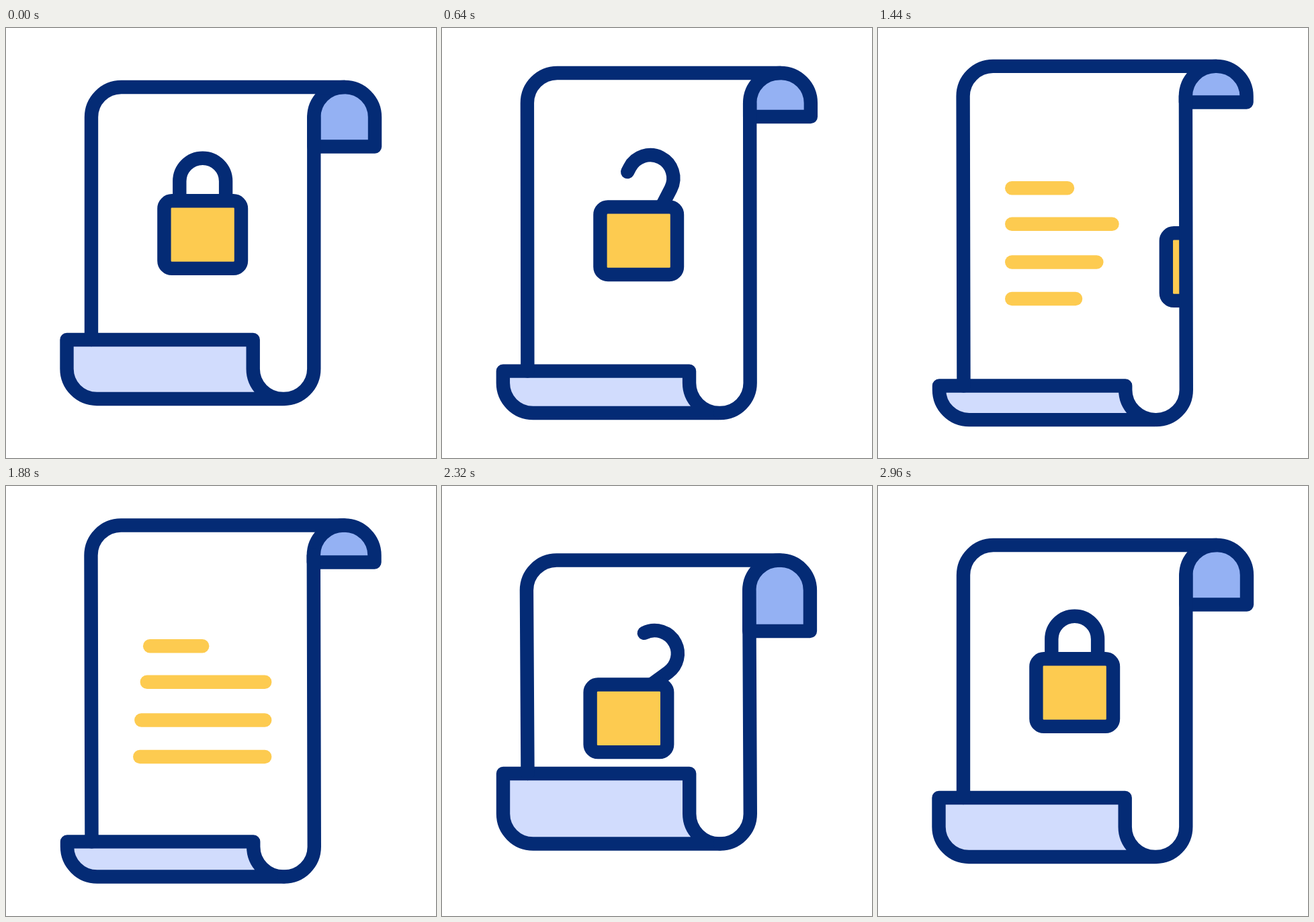
Animation, 640 px wide and 640 px high, one loop 3000 ms. Source, as an HTML page with a canvas:

```html
<!DOCTYPE html>
<html lang="en">
<head>
<meta charset="utf-8">
<title>Unlocking scroll</title>
<style>
html, body { margin: 0; width: 100%; height: 100%; overflow: hidden; background: #fff; }
canvas { display: block; width: 640px; height: 640px; }
</style>
</head>
<body>
<canvas id="stage" width="640" height="640"></canvas>
<script>
const ctx = document.getElementById('stage').getContext('2d');
const LOOP = 3000, STEP = 40;
const NAVY = '#042b75', YELLOW = '#fdcb50', BLUE = '#94b1f3', PALE = '#d1dcfd';
const RADIUS = 44.7;

const ease = p => p < 0.5 ? 4 * p ** 3 : 1 - 4 * (1 - p) ** 3;
const progress = (t, start, length) => ease(Math.min(1, Math.max(0, (t - start) / length)));

// Eased value of a track given as [time, value] pairs
function at(track, t) {
  let value = track[0][1];
  for (let i = 1; i < track.length; i++) {
    const [t0, v0] = track[i - 1], [t1, v1] = track[i];
    if (t >= t0) value = v0 + (v1 - v0) * progress(t, t0, t1 - t0);
  }
  return value;
}

const PAPER_TIMES = [200, 960, 1320, 1760, 2440, 2960];
const paperTrack = (...values) => values.map((v, i) => [PAPER_TIMES[i], v]);
const paper = {
  top: paperTrack(88, 58, 56.8, 57.3, 111.7, 88),
  curl: paperTrack(176.5, 113, 110.5, 111.2, 218.4, 176.5),
  bottom: paperTrack(552, 582, 583.2, 582.7, 531.4, 552),
  fold: paperTrack(464, 530.5, 532.5, 531.7, 425.6, 464),
  leanTop: paperTrack(0, -0.2, -0.4, -0.5, -1.1, 0),
  leanBottom: paperTrack(0, 0.5, 0.5, 0.5, 0.5, 0)
};

const lock = {
  x: [[960, 0], [1760, 260], [1920, 260], [2400, -20], [2440, -20], [2920, 0]],
  y: [[200, 0], [440, -1.2], [960, 44], [1440, 48], [1960, 48], [2400, 38], [2440, 38], [2920, 0]],
  tilt: [[240, 0], [960, 42], [1440, 10], [1920, 10], [2360, 54], [2420, 54], [2900, 0]],
  open: [[240, 0], [960, 1], [2420, 1], [2900, 0]]
};

const rows = [[238.3, 93], [291.8, 186], [348.5, 186], [403, 186]];

function paint(fill, width = 20.4) {
  if (fill) {
    ctx.fillStyle = fill;
    ctx.fill();
  }
  ctx.strokeStyle = NAVY;
  ctx.lineWidth = width;
  ctx.stroke();
}

function drawRows(t) {
  ctx.strokeStyle = YELLOW;
  ctx.lineWidth = 20.4;
  rows.forEach(([y, length], i) => {
    const end = progress(t, 1021 + 39 * i, 600);
    const start = progress(t, 1743 + 40 * i, 400);
    if (end <= 0 || start >= 1) return;
    ctx.beginPath();
    ctx.moveTo(199.2 + length * start, y);
    ctx.lineTo(199.2 + length * end, y);
    ctx.stroke();
  });
}

function drawLock(t) {
  const open = at(lock.open, t), leg = 29.5 + 2 * open, r = 34.4;
  ctx.save();
  ctx.beginPath();
  ctx.rect(0, 0, 458, 640);
  ctx.clip();
  ctx.translate(292.7 + at(lock.x, t), 307.6 + at(lock.y, t));

  // The shackle turns on its right foot while its left leg is trimmed away
  ctx.save();
  ctx.translate(r - open, -50);
  ctx.rotate(at(lock.tilt, t) * Math.PI / 180);
  const trim = 35 * open, arcTrim = Math.max(0, trim - 29.5) / r;
  ctx.beginPath();
  if (trim < 29.5) ctx.moveTo(-2 * r, -trim * leg / 29.5);
  if (trim < 29.5) ctx.lineTo(-2 * r, -leg);
  ctx.arc(-r, -leg, r, Math.PI + arcTrim, 2 * Math.PI);
  ctx.lineTo(0, 0);
  paint();
  ctx.restore();

  ctx.beginPath();
  ctx.roundRect(-57.3, -50.3, 114.6, 100.6, 11.5);
  paint(YELLOW);
  ctx.restore();
}

function drawPaper(t) {
  const { top, curl, bottom, fold, leanTop, leanBottom } =
    Object.fromEntries(Object.entries(paper).map(([key, track]) => [key, at(track, t)]));
  const r = RADIUS, a = leanTop, b = leanBottom;

  // Curled top end
  ctx.beginPath();
  ctx.moveTo(458.3 + a, curl);
  ctx.lineTo(458.3 + a, top + r);
  ctx.arcTo(458.3 + a, top, 504 + a, top, r);
  ctx.arcTo(549 + a, top, 549 + a, top + r, r);
  ctx.lineTo(549 + a, curl);
  ctx.closePath();
  paint(BLUE);

  // Folded bottom end
  ctx.beginPath();
  ctx.moveTo(90.5 + b, fold);
  ctx.lineTo(367.7 + b, fold);
  ctx.lineTo(367.7 + b, bottom - r);
  ctx.arcTo(367.7 + b, bottom, 413 + b, bottom, r);
  ctx.lineTo(135.5 + b, bottom);
  ctx.arcTo(90.5 + b, bottom, 90.5 + b, bottom - r, r);
  ctx.closePath();
  paint(PALE);

  // Sheet edges
  ctx.beginPath();
  ctx.moveTo(127 + b, fold);
  ctx.lineTo(127 + a, top + r);
  ctx.arcTo(127 + a, top, 172 + a, top, r);
  ctx.lineTo(504 + a, top);
  ctx.moveTo(458.3 + a, top + r);
  ctx.lineTo(458.3 + b, bottom - r);
  ctx.arcTo(458.3 + b, bottom, 413 + b, bottom, r);
  paint();
}

function frame(now) {
  const t = Math.floor((now % LOOP) / STEP) * STEP;
  ctx.fillStyle = '#fff';
  ctx.fillRect(0, 0, 640, 640);
  ctx.lineCap = ctx.lineJoin = 'round';
  drawRows(t);
  drawLock(t);
  drawPaper(t);
}

const begin = performance.now();
function tick() {
  frame(performance.now() - begin);
  requestAnimationFrame(tick);
}
tick();
</script>
</body>
</html>
```
